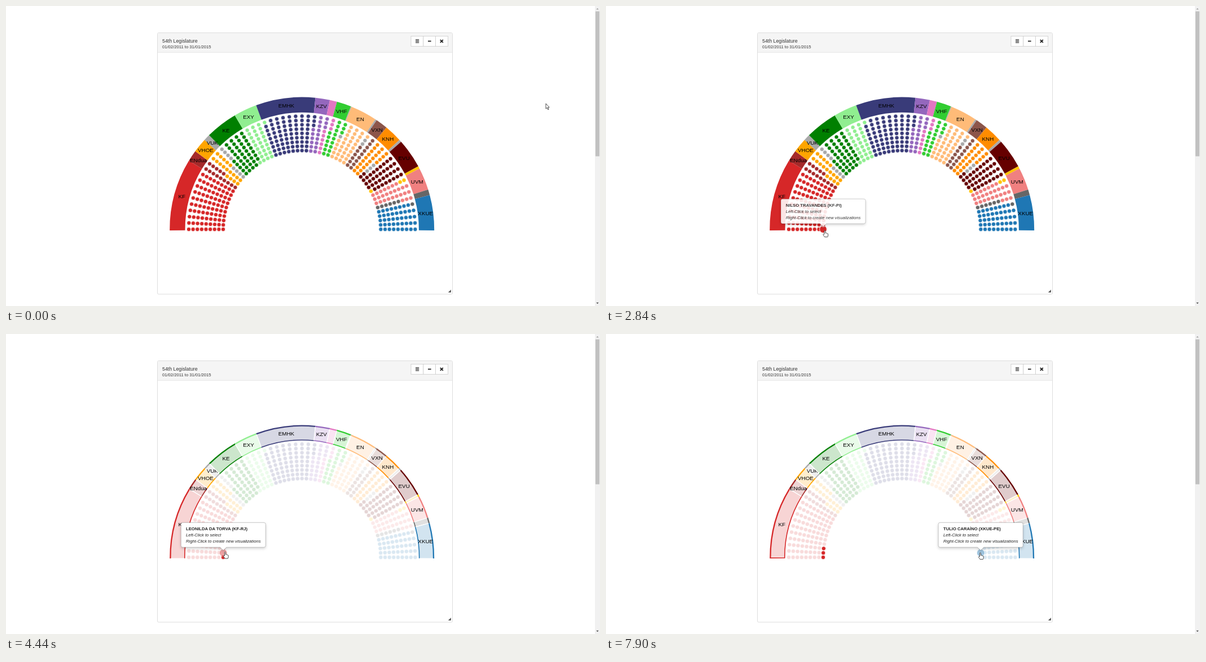
An HTML page that plays this animation: 1053 px wide and 532 px high, repeating every 8000 ms.

```html
<!DOCTYPE html>
<html lang="en">
<head>
<meta charset="utf-8">
<title>54th Legislature</title>
<style>
  html, body { margin: 0; width: 100%; height: 100%; overflow: hidden; background: #fff; }
  svg { display: block; width: 100vw; height: 100vh; font-family: "Liberation Sans", Arial, sans-serif; }
  .label { font-size: 9.83px; text-anchor: middle; }
  .tip { filter: drop-shadow(0 2.5px 2.5px rgba(0, 0, 0, .2)); }
  .tip text { font-size: 7.65px; fill: #222; }
  .tip .name { font-weight: bold; }
  .tip .hint { font-style: italic; }
</style>
</head>
<body>
<svg id="stage" viewBox="0 0 1053 532">
  <rect x="268.5" y="47.5" width="523" height="463.5" rx="2" fill="#fff" stroke="#ddd"/>
  <path d="M269 82V49.5Q269 48 270.5 48H789.5Q791 48 791 49.5V82Z" fill="#f5f5f5"/>
  <path d="M269 82.2H791" stroke="#ddd" stroke-width=".8"/>
  <text x="277" y="65.4" font-size="8.8" fill="#333">54th Legislature</text>
  <text x="277" y="74.8" font-size="7.65" fill="#333">01/02/2011 to 31/01/2015</text>
  <g fill="#fff" stroke="#ccc" stroke-width=".8">
    <rect x="718" y="53.5" width="21.8" height="18"/>
    <rect x="739.8" y="53.5" width="21.8" height="18"/>
    <rect x="761.6" y="53.5" width="21.8" height="18"/>
  </g>
  <g stroke="#222" fill="none">
    <path d="M726 59.8H732.2M726 62.3H732.2M726 64.8H732.2" stroke-width="1.3"/>
    <path d="M748 62.4H753.6" stroke-width="1.8"/>
    <path d="M769.8 59.8L774.8 64.8M774.8 59.8L769.8 64.8" stroke-width="1.9"/>
  </g>
  <path d="M788.8 503V508H783.8Z" fill="#555"/>
  <rect x="1044" width="9" height="532" fill="#f1f1f1"/>
  <rect x="1045" y="9.5" width="7" height="257" fill="#c1c1c1"/>
  <path d="M1046.3 6.2L1048.5 3.8L1050.7 6.2Z" fill="#a3a3a3"/>
  <path d="M1046.3 525.8L1048.5 528.2L1050.7 525.8Z" fill="#505050"/>
  <g id="dots" stroke="#fff" stroke-width=".8"></g>
  <g id="bases"></g>
  <g id="covers"></g>
  <g id="tips"></g>
  <path id="cursor" fill="#fff" stroke="#222" stroke-width=".8" stroke-linejoin="round"/>
</svg>
<script>
const LOOP = 8000, CX = 524.7, CY = 396, SEATS = 513, RINGS = 9;
const DIM = 0.16, DOT = 3.65, BIG = 6.7;

// label, seats, colour
const parties = [
  ['KF', 90, '#d62728'], ['ENdua', 14, '#a52a2a'], ['VHOE', 18, '#ffa500'],
  ['VUK', 8, '#a9a9a9'], ['KE', 40, '#008000'], ['EXY', 29, '#90ee90'],
  ['EMHK', 74, '#393b79'], ['KZV', 18, '#9467bd'], ['', 9, '#e377c2'],
  ['VHF', 18, '#32cd32'], ['', 1, '#a9a9a9'], ['EN', 33, '#ffbb78'],
  ['', 2, '#a9a9a9'], ['VXN', 15, '#8c564b'], ['KNH', 22, '#ff8c00'],
  ['', 3, '#a9a9a9'], ['EVU', 37, '#660000'], ['', 3, '#ffc300'],
  ['UVM', 28, '#f08080'], ['', 7, '#666'], ['XKUE', 44, '#1f77b4']
];

const hints = ['Left-Click to select', 'Right-Click to create new visualizations'];
const hovers = [
  { seat: 8, on: 2700, off: 3490, click: 3240, name: ['NILSO TRAVANDES (KF-PI)'] },
  { seat: 17, on: 4160, off: 5000, click: 4560, name: ['LEONILDA DA TORVA (KF-RJ)'] },
  { seat: 26, on: 5060, off: 5840, click: 5440, name: ['ALCINOR MODEIRO (KF-SP)'] },
  { seat: 512, on: 6240, off: 7460, name: ['CLAUDINO VERAS DE LOMBO', '(XKUE-CE)'] },
  { seat: 503, on: 7540, off: 9000, name: ['TULIO CARAÍNO (XKUE-PE)'] }
];
const partyHover = { on: 900, off: 1626 };

// time, x, y, hand?
const track = [
  [0, 957, 173, 0], [499, 957, 173, 0], [500, 300, 394, 1], [1500, 300, 394, 1],
  [1620, 340, 406, 0], [1770, 398.5, 419, 0], [2000, 398.5, 419, 0], [2300, 389, 399, 0],
  [2500, 388.5, 398.5, 0], [2700, 388, 398, 1], [3300, 388, 398, 1], [3480, 397, 392, 0],
  [3570, 399.5, 391, 0], [4040, 397, 390, 0], [4160, 388.5, 386.5, 1], [4970, 388.5, 386.5, 1],
  [5060, 387.5, 379, 1], [5840, 387.5, 379, 1], [5900, 640, 396, 0], [6100, 640, 396, 0],
  [6220, 667, 402, 1], [6400, 667, 398, 1], [6840, 667, 398, 1], [7000, 666, 395, 1],
  [7440, 666, 395, 1], [7560, 663.5, 388, 1], [8000, 663.5, 388, 1]
];
const ARROW = 'M0 0V9.2L2.1 7.3L3.7 10.8L5.1 10.2L3.6 6.8H6.2Z';
const HAND = 'M-1 6.8V1Q-1 0 0 0Q1 0 1 1V4.6Q2.2 3.9 2.8 5Q4 4.4 4.4 5.6Q5.6 5.2 5.6 6.6V9Q5.6 10.2 4.8 11.6H-.4Q-1.8 9.6 -3.2 7.4Q-2.6 5.8 -1 6.8Z';

const $ = id => document.getElementById(id);
const clamp = x => Math.max(0, Math.min(1, x));
const lerp = (a, b, k) => a + (b - a) * k;
const ramp = (t, start, ms) => clamp((t - start) / ms);
const cubic = k => k < .5 ? 4 * k ** 3 : 1 - 4 * (1 - k) ** 3;
const pulse = (t, on, off, ms = 160) => ramp(t, on, ms) - ramp(t, off, ms);

function add(parent, tag, attrs, text) {
  const el = document.createElementNS('http://www.w3.org/2000/svg', tag);
  for (const k in attrs) el.setAttribute(k, attrs[k]);
  if (text) el.textContent = text;
  return parent.appendChild(el);
}
function set(el, key, value) {
  if (el['_' + key] !== value) el.setAttribute(key, el['_' + key] = value);
}

// Angles in degrees run clockwise from the left end
const polar = (r, deg) => {
  const a = deg * Math.PI / 180;
  return [CX - r * Math.cos(a), CY - r * Math.sin(a)];
};
const pt = (r, deg) => polar(r, deg).map(v => v.toFixed(2)).join(' ');
const seatAngle = n => n / SEATS * 181 - .5;
const ring = (r0, r1, a, b) =>
  `M${pt(r1, a)}A${r1} ${r1} 0 0 1 ${pt(r1, b)}L${pt(r0, b)}A${r0} ${r0} 0 0 0 ${pt(r0, a)}Z`;
const seatPos = n => polar(200.7 - (n % RINGS) * 7.625, Math.floor(n / RINGS) * 180 / 56);

const dots = [], covers = [];
let first = 0;
parties.forEach(([label, count, fill]) => {
  const a = seatAngle(first), b = seatAngle(first + count);
  add($('bases'), 'path', { d: ring(207.2, 234.5, a, b), fill });
  covers.push({
    a, b,
    area: add($('covers'), 'path', { fill: '#fff', 'fill-opacity': .8 }),
    sides: add($('covers'), 'path', { stroke: '#fff', 'stroke-width': 1.1 })
  });
  if (label) {
    const [x, y] = polar(220.8, (a + b) / 2);
    add($('covers'), 'text', { x, y: y + 3.4, class: 'label' }, label);
  }
  for (let n = first; n < first + count; n++) {
    const [cx, cy] = seatPos(n);
    dots.push(add($('dots'), 'circle', { cx, cy, fill }));
  }
  first += count;
});

function makeTip(x, bottom, width, name, rest) {
  const g = add($('tips'), 'g', { class: 'tip' });
  const lines = name.length + rest.length, h = lines * 10.92 + 11, top = bottom - h;
  const l = x - width / 2, r = x + width / 2, c = 3;
  add(g, 'path', {
    d: `M${l + c} ${top}H${r - c}Q${r} ${top} ${r} ${top + c}V${bottom - c}Q${r} ${bottom} ${r - c} ${bottom}` +
       `H${x + 5.5}L${x} ${bottom + 5.5}L${x - 5.5} ${bottom}H${l + c}Q${l} ${bottom} ${l} ${bottom - c}` +
       `V${top + c}Q${l} ${top} ${l + c} ${top}Z`,
    fill: '#fff', stroke: '#000', 'stroke-opacity': .25, 'stroke-width': .8
  });
  [...name, ...rest].forEach((s, i) => add(g, 'text', {
    x: l + 8.8, y: top + 13.7 + i * 10.92, class: i < name.length ? 'name' : 'hint'
  }, s));
  return g;
}
partyHover.tip = makeTip(319.5, 266.5, 67, ['KF'], ['90 Deputies', 'Click to select']);
for (const h of hovers) {
  const [x, y] = seatPos(h.seat);
  h.tip = makeTip(x, y - 10, 150, h.name, hints);
}

function showTip(tip, k) {
  set(tip, 'opacity', k);
  set(tip, 'visibility', k > 0 ? 'visible' : 'hidden');
}

function drawDots(t) {
  const party = t < partyHover.on ? 0 : 1 - ramp(t, partyHover.off + 150, 160);
  const base = lerp(1, DIM, ramp(t, 3240, 130));
  dots.forEach((dot, n) => {
    let grow = n < 90 ? party : 0, alpha = base;
    const h = hovers.find(v => v.seat === n);
    if (h) {
      const k = pulse(t, h.on, h.off + 150);
      grow = Math.max(grow, k);
      alpha = Math.max(alpha, .42 * k);
      if (h.click) alpha = lerp(alpha, 1, ramp(t, h.click, 60));
    }
    set(dot, 'r', lerp(DOT, BIG, grow));
    set(dot, 'opacity', alpha);
  });
}

function drawCovers(t) {
  const share = cubic(ramp(t, 3300, 750));
  covers.forEach(({ a, b, area, sides }, i) => {
    const k = i ? share : share - .018 * cubic(ramp(t, 5480, 290));
    const from = lerp(b, a, k), r0 = 208.8, r1 = 232.2;
    set(area, 'd', k > 0 ? ring(r0, r1, from, b) : '');
    set(sides, 'd', k > 0 ? `M${pt(r0, from)}L${pt(r1, from)}M${pt(r0, b)}L${pt(r1, b)}` : '');
  });
}

function drawCursor(t) {
  const i = Math.max(1, track.findIndex(p => p[0] > t));
  const p = track[i - 1], q = track[i], k = (t - p[0]) / (q[0] - p[0]);
  set($('cursor'), 'd', p[3] ? HAND : ARROW);
  set($('cursor'), 'transform', `translate(${lerp(p[1], q[1], k)} ${lerp(p[2], q[2], k)})`);
}

function draw(t) {
  drawDots(t);
  drawCovers(t);
  showTip(partyHover.tip, t < partyHover.on ? 0 : 1 - ramp(t, partyHover.off, 160));
  for (const h of hovers) showTip(h.tip, pulse(t, h.on, h.off));
  drawCursor(t);
}

const began = performance.now();
function tick() {
  draw((performance.now() - began) % LOOP);
  requestAnimationFrame(tick);
}
tick();
</script>
</body>
</html>
```
